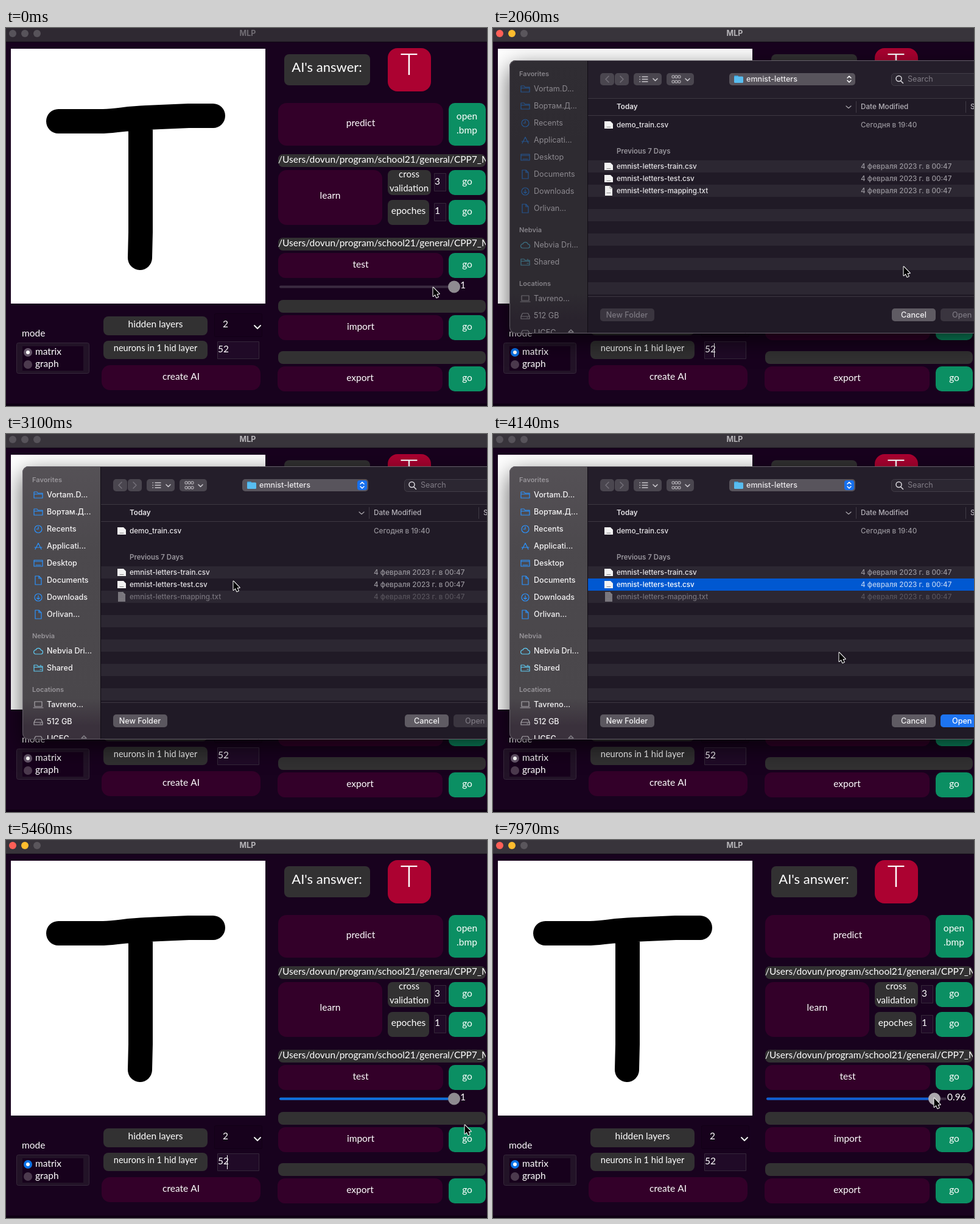
An HTML page with a canvas for the animation above (8000 ms loop, 790 px wide and 620 px high).

```html
<!DOCTYPE html>
<html lang="en">
<head>
<meta charset="utf-8">
<title>MLP</title>
<style>
html, body { margin: 0; height: 100%; overflow: hidden; background: #18021e; }
canvas { display: block; }
</style>
</head>
<body>
<canvas id="stage" width="790" height="620"></canvas>
<script>
const ctx = document.getElementById('stage').getContext('2d');
const LOOP = 8000;
const HAND = 'Lato, sans-serif', UI = 'Inter, sans-serif';
const GREY = '#323132', PLUM = '#330029', GREEN = '#0b8f63', FIELD = '#200a27', EDGE = '#35283a';

// Pointer legs: start, end, number of steps, target x, target y
const LEGS = [
  [450, 1470, 8, 674, 391], [2210, 3100, 7, 373, 241],
  [3690, 4720, 8, 762, 475], [4860, 5310, 4, 753, 468], [5460, 5460, 1, 753, 467],
  [5760, 6350, 5, 735, 424], [6500, 6790, 3, 728, 423],
  [6940, 7370, 4, 721, 423], [7820, 7970, 2, 724, 423]
];

function pointerAt(t) {
  let x = 701, y = 425;
  for (const [start, end, n, tx, ty] of LEGS) {
    if (t < start) break;
    const step = n > 1 ? Math.floor((t - start) * (n - 1) / (end - start) + 0.04) : 0;
    const p = Math.min(1, (step + 1) / n), e = p * p * (3 - 2 * p);
    x += (tx - x) * e;
    y += (ty - y) * e;
  }
  return [Math.round(x), Math.round(y)];
}

function box(x1, y1, x2, y2, r, fill, stroke) {
  ctx.beginPath();
  ctx.roundRect(x1, y1, x2 - x1, y2 - y1, r);
  if (fill) { ctx.fillStyle = fill; ctx.fill(); }
  if (stroke) { ctx.strokeStyle = stroke; ctx.lineWidth = 1; ctx.stroke(); }
}

function disc(x, y, r, fill) {
  ctx.beginPath();
  ctx.arc(x, y, r, 0, 7);
  ctx.fillStyle = fill;
  ctx.fill();
}

function path(d, color, width = 1.2, x = 0, y = 0) {
  ctx.save();
  ctx.translate(x, y);
  ctx.strokeStyle = color;
  ctx.lineWidth = width;
  ctx.lineCap = ctx.lineJoin = 'round';
  ctx.stroke(new Path2D(d));
  ctx.restore();
}

function text(s, x, y, font, color = '#fff', align = 'left') {
  ctx.font = font;
  ctx.fillStyle = color;
  ctx.textAlign = align;
  ctx.textBaseline = 'middle';
  ctx.fillText(s, x, y);
}

const hand = (s, x, y, align = 'left', size = 15.5) => text(s, x, y, `${size}px ${HAND}`, '#fff', align);

function button(x1, y1, x2, y2, fill, label, ty, r = 10) {
  box(x1, y1, x2, y2, r, fill);
  hand(label, (x1 + x2) / 2, ty, 'center', label.length > 20 ? 14.6 : 15.5);
}

function strip(y, label) {
  box(447, y, 788, y + 21, 8, GREY);
  if (!label) return;
  ctx.save();
  ctx.beginPath();
  ctx.rect(447, y - 4, 341, 30);
  ctx.clip();
  hand(label, 447, y + 9);
  ctx.restore();
}

function titleBar(t, focused) {
  const front = t >= 1620;
  box(0, 0, 790, 23, 0, front ? '#38343b' : '#2f2932');
  box(0, 22.5, 790, 23.5, 0, '#0c0510');
  const lights = focused ? ['#ff5f57', '#febc2e', '#5a565c'] : ['#57535a', '#57535a', '#57535a'];
  lights.forEach((c, i) => disc(11 + 20 * i, 9, 6, c));
  text('MLP', 397, 9, `bold 12.5px ${UI}`, front ? '#b6b4b8' : '#716d74', 'center');
}

function drawing() {
  box(8, 34, 426, 452, 0, '#fff');
  path('M86 153H160C185 152 200 148 230 147L300 144H340M221 150V335L220 377', '#000', 40);
}

function radio(y, label, on, focused) {
  disc(36, y, 7, on ? (focused ? '#0b72e6' : '#65566a') : '#4c3a4e');
  if (on) disc(36, y, 3, '#fff');
  hand(label, 48, y - 1);
}

function settings(focused, caret) {
  hand('mode', 26, 501);
  box(17.5, 516.5, 136.5, 566.5, 3, '#221327', EDGE);
  box(27, 522, 127, 562, 0, '#17011c');
  radio(532, 'matrix', true, focused);
  radio(552, 'graph', false, focused);
  button(160, 473, 331, 504, GREY, 'hidden layers', 486, 8);
  button(160, 513, 331, 543, GREY, 'neurons in 1 hid layer', 526, 8);
  button(157, 553, 418, 594, PLUM, 'create AI', 572, 14);
  box(342.5, 468.5, 420.5, 506.5, 2, '#17011c', '#120016');
  hand('2', 356, 486);
  path('M408 488l5 5l5-5', '#eee', 2);
  box(347.5, 514.5, 415.5, 542.5, 0, FIELD, EDGE);
  hand('52', 348, 527);
  if (caret) box(363, 517, 364, 540, 0, '#fff');
}

function slider(handle, focused, pressed) {
  box(449, 422.5, 745, 426.5, 2, '#3b2b41');
  if (focused) box(449, 422.5, handle, 426.5, 2, pressed ? '#0f60d6' : '#0d72e0');
  disc(handle, 424.5, 10, pressed ? '#aca8ae' : '#8f8b91');
  const value = 1 - (736 - handle) / 279;
  hand(value > 0.995 ? '1' : value.toFixed(2), 746, 422);
}

function controls(handle, focused, pressed) {
  box(457, 43, 598, 94, 8, GREY);
  hand("AI's answer:", 527, 65, 'center', 22);
  box(627, 33, 698, 104, 16, '#ac0231');
  text('T', 662, 62, `300 49px ${HAND}`, '#fff', 'center');

  button(447, 123, 718, 193, PLUM, 'predict', 156, 14);
  box(727, 123, 788, 193, 10, GREEN);
  hand('open', 757, 145, 'center');
  hand('.bmp', 757, 168, 'center');

  const file = '/Users/dovun/program/school21/general/CPP7_MLP';
  strip(207, file);
  button(447, 233, 618, 323, PLUM, 'learn', 275, 14);
  box(627, 233, 698, 274, 8, GREY);
  hand('cross', 662, 240, 'center', 15);
  hand('validation', 662, 263, 'center', 15);
  button(627, 282, 695, 323, GREY, 'epoches', 300, 8);
  box(703.5, 238.5, 722.5, 267.5, 0, FIELD, EDGE);
  box(703.5, 287.5, 722.5, 316.5, 0, FIELD, EDGE);
  hand('3', 704, 252);
  hand('1', 704, 300);

  strip(344, file);
  button(447, 369, 718, 410, PLUM, 'test', 388, 12);
  slider(handle, focused, pressed);
  strip(446);
  button(447, 471, 718, 512, PLUM, 'import', 490, 12);
  strip(530);
  button(446, 555, 717, 596, PLUM, 'export', 574, 12);
  for (const y of [233, 282, 369, 471, 555]) button(727, y, 788, y + 41, GREEN, 'go', y + 19);
}

// Sidebar glyphs, drawn around their centre
const FOLDER = 'M-7-5h5l1.5 2h7.5v8h-14zM-7-1.5h14';
const PAGE = 'M-5-7h6l4 4v10h-10zM1-7v4h4';
const CIRCLE = 'M6 0a6 6 0 1 1-12 0a6 6 0 1 1 12 0';
const DISK = 'M-7 1l2.5-5h9l2.5 5v4h-14zM-7 1h14M3 3h1';
const SIDEBAR = [
  [100, 'Vortam.D...', FOLDER], [128, 'Вортам.Д...', FOLDER],
  [156, 'Recents', CIRCLE + 'M0-4v4h-3'], [184, 'Applicati...', 'M-5 5L0-5L5 5M-6 2H6'],
  [212, 'Desktop', 'M-7-5h14v10h-14zM-7-3h14M-4 3h8'], [240, 'Documents', PAGE],
  [268, 'Downloads', CIRCLE + 'M0-3v6M-2.5 1l2.5 2l2.5-2'], [296, 'Orlivan...', PAGE],
  [356, 'Nebvia Dri...', 'M-4 5h8a3.2 3.2 0 0 0 .5-6.4a4.5 4.5 0 0 0-8.5-.4a3.4 3.4 0 0 0 0 6.8'],
  [384, 'Shared', FOLDER + 'M3 2h2M4-5v1'],
  [444, 'Tavreno...', 'M-6-5h12v8h-12zM-8 5h16'], [472, '512 GB', DISK], [500, 'LICEC', DISK]
];

function sidebar(active) {
  const g = ctx.createLinearGradient(0, 53, 0, 501);
  const shades = active ? ['#555156', '#4c494d', '#4a474b', '#3a313c'] : ['#302d33', '#2e2b31', '#2e2b31', '#29232d'];
  [0, 0.3, 0.85, 0.95].forEach((at, i) => g.addColorStop(at, shades[i]));
  box(27, 53, 155, 501, 0, g);
  box(155, 53, 156, 501, 0, '#100c14');
  [[76, 'Favorites'], [332, 'Nebvia'], [420, 'Locations']].forEach(([y, s]) =>
    text(s, 43, y, `600 11px ${UI}`, active ? '#98959a' : '#858288'));
  for (const [y, label, icon] of SIDEBAR) {
    const color = y < 320 ? (active ? '#2b93ff' : '#24558f')
      : y < 400 ? (active ? '#5fcdf5' : '#3c7083') : (active ? '#a9a6ab' : '#6d6a70');
    path(icon, color, 1.2, 53, y);
    text(label, 67, y, `${active ? 500 : 400} 12.6px ${UI}`, active ? '#f4f3f4' : '#8c898f');
  }
  path('M124 499l4-4l4 4z', '#8c898f');
}

function toolbar(active) {
  const btn = '#4a464f', ink = '#c9c6cc';
  box(176, 74, 199, 94, 5, btn);
  box(200, 74, 223, 94, 5, btn);
  path('M190 79l-5 5l5 5M209 79l5 5l-5 5', '#77737c', 1.4);
  box(231, 74, 277, 94, 5, btn);
  path('M245 80h9M245 84h9M245 88h9M241 80h.5M241 84h.5M241 88h.5', ink, 1.4);
  box(285, 74, 330, 94, 5, btn);
  for (let i = 0; i < 3; i++) {
    box(294 + 5 * i, 78, 298 + 5 * i, 82, 1, null, ink);
    box(294 + 5 * i, 86, 298 + 5 * i, 90, 1, null, ink);
  }
  path('M263 83l3.5 3.5l3.5-3.5M316 83l3.5 3.5l3.5-3.5', ink, 1.6);

  box(388, 74, 595, 94, 5, '#58545c');
  box(396, 78, 403, 82, 1, '#3a9fd6');
  box(396, 79.5, 411, 90, 1.5, '#58bdf0');
  text('emnist-letters', 416, 84, `500 12.6px ${UI}`, '#eceaed');
  if (active) box(577, 76, 593, 92, 4, '#1670ee');
  path('M582 82l3-3l3 3M582 86l3 3l3-3', '#fff', 1.5);

  box(654.5, 74.5, 810, 94.5, 5, '#2c2732', '#423d47');
  path('M671 83a4.5 4.5 0 1 1-9 0a4.5 4.5 0 1 1 9 0M670 87l3.5 3.5', '#dddbe0', 1.5);
  text('Search', 681, 84.5, `12.6px ${UI}`, '#817d86');
}

function fileRow(y, name, date, { selected, dim, tall } = {}) {
  if (selected) box(156, y - 10, 790, y + 10, 0, '#0058d1');
  ctx.globalAlpha = dim ? 0.4 : 1;
  if (tall) {
    path('M184.500 0', '#fff');
    ctx.fillStyle = '#eee';
    ctx.fill(new Path2D(`M184 ${y - 8}h8l4 4v12h-12z`));
    path(`M192 ${y - 8}v4h4`, '#999', 1);
  } else {
    ctx.fillStyle = '#f2f2f2';
    ctx.fill(new Path2D(`M183 ${y - 6}h10l4 4v8h-14z`));
  }
  path(`M187 ${y + 3.500}h6`, '#8b8b8b', 1);
  text(name, 203, y, `500 11.7px ${UI}`, selected ? '#fff' : '#e9e7ea');
  text(date, 604, y, `500 11.7px ${UI}`, selected ? '#b9d0f2' : '#98959c');
  ctx.globalAlpha = 1;
}

function fileList(active, selected) {
  for (const y of [115, 143, 440]) box(156, y, 790, y + 1, 0, '#3d3842');
  for (const x of [596, 776]) box(x, 120, x + 1, 139, 0, '#413c46');
  text('Today', 203, 129, `600 11.7px ${UI}`, '#e4e2e6');
  path('M580 128l4 3.500l4-3.500', '#aaa7ad', 1.2);
  text('Date Modified', 604, 129, `500 11.7px ${UI}`, '#b4b1b8');
  text('S', 784, 129, `500 11.7px ${UI}`, '#b4b1b8');
  for (let y = 217; y < 437; y += 40) box(156, y, 790, y + 20, 0, '#2c2732');

  const date = '4 февраля 2023 г. в 00:47';
  fileRow(159, 'demo_train.csv', 'Сегодня в 19:40');
  text('Previous 7 Days', 203, 203, `600 11.5px ${UI}`, '#98959c');
  fileRow(227, 'emnist-letters-train.csv', date);
  fileRow(247, 'emnist-letters-test.csv', date, { selected });
  fileRow(267, 'emnist-letters-mapping.txt', date, { tall: true, dim: active });
}

function dialog(active, selected) {
  ctx.save();
  ctx.shadowColor = 'rgba(0,0,0,.65)';
  ctx.shadowBlur = 38;
  ctx.shadowOffsetY = 12;
  box(27, 53, 820, 501, 10, '#201a26');
  ctx.restore();

  ctx.save();
  box(27, 53, 820, 501, 10);
  ctx.clip();
  box(156, 53, 790, 115, 0, '#241e2a');
  sidebar(active);
  toolbar(active);
  fileList(active, selected);
  const label = `500 12.6px ${UI}`, off = '#7b7780';
  box(176, 460, 265, 481, 5, active ? '#5b575f' : '#3a353f');
  text('New Folder', 220, 471, label, active ? '#f2f1f3' : off, 'center');
  box(655, 460, 727, 481, 5, '#5f5b63');
  text('Cancel', 691, 471, label, '#f2f1f3', 'center');
  box(735, 460, 807, 481, 5, selected ? '#1d74f2' : '#3a353f');
  text('Open', 754, 471, label, selected ? '#fff' : off);
  ctx.restore();
  box(27.5, 53.5, 820, 500.5, 10, null, '#66616a');
}

function pointer(x, y) {
  const arrow = new Path2D('M.5.500v14.500l3.300-3l2.400 5.300l2.600-1.200l-2.400-5.100h4.300z');
  ctx.save();
  ctx.translate(x, y);
  ctx.lineJoin = 'round';
  ctx.lineWidth = 2;
  ctx.strokeStyle = '#fff';
  ctx.stroke(arrow);
  ctx.fillStyle = '#000';
  ctx.fill(arrow);
  ctx.restore();
}

function draw(t) {
  const open = t >= 2060 && t < 5460;
  const focused = t >= 1620 && t < 2210 || t >= 5460;
  const blinkOn = t < 5705 || Math.floor((t - 5705) / 530) % 2 === 1;
  const pressed = t >= 6350;
  const [x, y] = pointerAt(t);

  box(0, 0, 790, 620, 0, '#18021e');
  box(0, 616, 790, 620, 0, '#0e0013');
  titleBar(t, focused);
  drawing();
  settings(focused, focused && t >= 1770 && blinkOn);
  controls(pressed ? x + 1 : 736, focused, pressed);
  if (open) dialog(t >= 2210, t >= 3400);
  pointer(x, y);
}

function frame() {
  draw(performance.now() % LOOP);
  requestAnimationFrame(frame);
}
frame();
</script>
</body>
</html>
```
